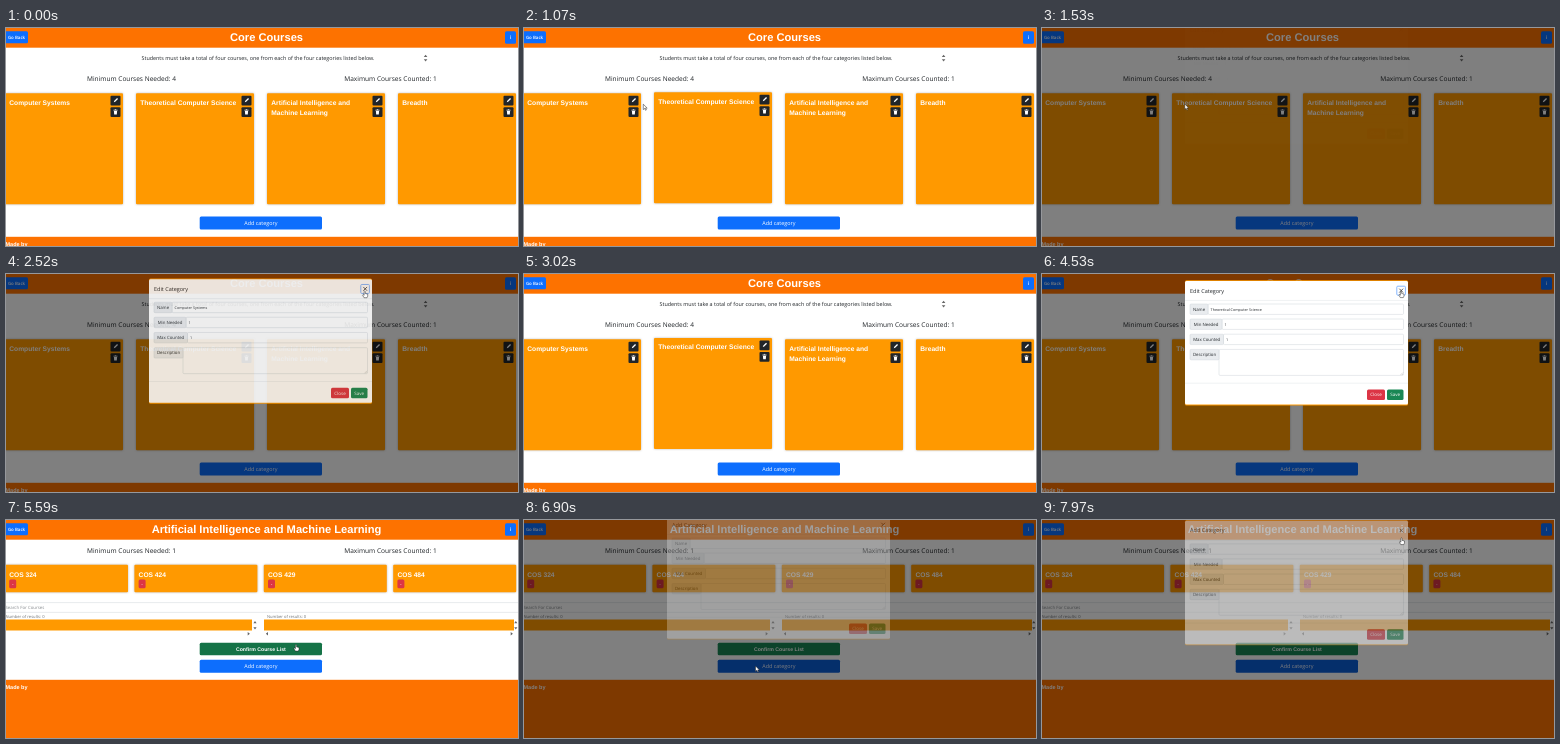
These frames come from a looping animation (512 px wide and 218 px high, 8 s). An HTML page:

```html
<!DOCTYPE html>
<html lang="en">
<head>
<meta charset="utf-8">
<title>Course categories</title>
<style>
html, body { margin: 0; width: 100%; height: 100%; overflow: hidden; background: #fff; }
svg { display: block; width: 100vw; height: 100vh; }
text { font-family: "Open Sans", "Noto Sans", sans-serif; text-rendering: geometricPrecision; white-space: pre; }
.b { font-family: "Liberation Sans", Arial, sans-serif; font-weight: bold; }
.s { font-weight: 600; }
.card { filter: drop-shadow(0 .8px .8px rgba(0, 0, 0, .28)); }
</style>
</head>
<body>
<svg viewBox="0 0 512 218" preserveAspectRatio="none">
  <g id="list"></g>
  <g id="detail"></g>
  <rect id="dim" width="512" height="218"/>
  <g id="modal"></g>
  <g id="cursor" stroke="#222" stroke-width=".5" stroke-linejoin="round" fill="#fff">
    <path id="arrow" d="M0 0V5.4L1.3 4.2L2.2 6.1L3.1 5.7L2.2 3.9H3.9Z"/>
    <path id="hand" d="M-.6 .4Q0 -.6 .6 .4V2.4L3 3V5L2.3 6.6H-.7L-2.2 4L-1.6 3.4L-.6 4.2Z"/>
  </g>
</svg>
<script>
const LOOP = 8000, NAV = 5260;
const ORANGE = '#fd7200', AMBER = '#ff9900', BLUE = '#0d6efd', BLUE_ON = '#0b5ed7',
      GREEN = '#198754', GREEN_ON = '#157347', RED = '#dc3545', INK = '#212529';
const $ = id => document.getElementById(id);

function add(parent, tag, attrs) {
  const el = document.createElementNS('http://www.w3.org/2000/svg', tag);
  for (const k in attrs) el.setAttribute(k, attrs[k]);
  return parent.appendChild(el);
}
const rect = (g, x, y, width, height, fill, more) => add(g, 'rect', {x, y, width, height, fill, ...more});
const path = (g, d, more) => add(g, 'path', {d, ...more});
function text(g, str, x, y, size, fill, cls = '', anchor = 'start') {
  const el = add(g, 'text', {x, y, 'font-size': size, fill, class: cls, 'text-anchor': anchor});
  el.textContent = str;
  return el;
}
function button(g, label, x, y, w, h, fill, size, cls) {
  const box = rect(g, x, y, w, h, fill, {rx: 1.5});
  text(g, label, x + w / 2, y + h / 2 + size * .36, size, '#fff', cls, 'middle');
  return box;
}

function frame(g, title, footY, needY, needed) {
  rect(g, 0, 0, 512, 218, '#fff');
  rect(g, 0, 0, 512, 19.7, ORANGE);
  text(g, title, 260.5, 13.2, 11.15, '#fff', 'b', 'middle');
  button(g, 'Go Back', -1, 3.2, 23, 12, BLUE, 4.4, 's');
  button(g, 'i', 499, 3.2, 11, 12.6, BLUE, 5, 's');
  text(g, 'Minimum Courses Needed: ' + needed, 125.5, needY, 6.57, INK, '', 'middle');
  text(g, 'Maximum Courses Counted: 1', 384.5, needY, 6.57, INK, '', 'middle');
  rect(g, 0, footY, 512, 218 - footY, ORANGE);
  text(g, 'Made by', -.5, footY + 9.5, 5.5, '#fff', 'b');
}

// Category list page
const list = $('list');
frame(list, 'Core Courses', 208.8, 53.4, 4);
text(list, 'Students must take a total of four courses, one from each of the four categories listed below.',
  252, 32.2, 5.42, INK, '', 'middle');
path(list, 'M417.8 29L419.6 26.8L421.4 29ZM417.8 31.2L419.6 33.4L421.4 31.2Z', {fill: '#666'});
const cards = [['Computer Systems'], ['Theoretical Computer Science'],
  ['Artificial Intelligence and', 'Machine Learning'], ['Breadth']].map((lines, i) => {
  const x = -1 + 131 * i, g = add(list, 'g', {class: 'card'});
  rect(g, x, 65.3, 118, 111, AMBER, {rx: 1});
  lines.forEach((s, n) => text(g, s, x + 4.3, 76.6 + 10.2 * n, 6.67, '#fff', 'b'));
  for (const y of [67.7, 79.2]) rect(g, x + 105.5, y, 10, 9.8, INK, {rx: 1});
  path(g, `M${x + 108.8} 74.3l.5-1.5 2.8-2.8 .9.9-2.8 2.8Z`, {fill: '#fff'});
  path(g, `M${x + 108.4} 82.2h4.2M${x + 109.8} 81.6h1.4`, {stroke: '#fff', 'stroke-width': .7});
  path(g, `M${x + 108.9} 83h3.2l-.3 3.4h-2.6Z`, {fill: '#fff'});
  return g;
});
button(list, 'Add category', 193.7, 188.6, 122.3, 13, BLUE, 5.4);

// Single category page
const detail = $('detail');
frame(detail, 'Artificial Intelligence and Machine Learning', 159.8, 33.4, 1);
[324, 424, 429, 484].forEach((n, i) => {
  const x = -1 + 129.4 * i, g = add(detail, 'g', {class: 'card'});
  rect(g, x, 44.8, 123, 27.4, AMBER, {rx: 1});
  text(g, 'COS ' + n, x + 4.2, 56.8, 6.67, '#fff', 'b');
  button(g, '-', x + 4.2, 59.4, 7, 8.8, RED, 5);
});
path(detail, 'M0 82.6H512M0 92.4H512', {stroke: '#dfe2e6', 'stroke-width': .7});
text(detail, 'Search For Courses', -.6, 89.3, 4.35, '#85898d');
[-1, 258].forEach((x, i) => {
  text(detail, 'Number of results: 0', i ? 261 : -.6, 98.3, 4.1, '#6c7075');
  rect(detail, x, 99.5, i ? 250 : 247, 11, AMBER);
  const v = i ? 509.8 : 249, r = i ? 505.5 : 242.5;
  path(detail, `M${v - 1.6} 103.2l1.6-2.2 1.6 2.2ZM${v - 1.6} 107.2l1.6 2.2 1.6-2.2ZM${r - .8} 112l2.2 1.7-2.2 1.7Z`
    + (i ? 'M262 112l-2.2 1.7 2.2 1.7Z' : ''), {fill: '#666'});
});
const confirmBtn = button(detail, 'Confirm Course List', 193.7, 122.8, 122.3, 12.4, GREEN, 5.2, 'b');
const addBtn = button(detail, 'Add category', 193.7, 139.8, 122.3, 13, BLUE, 5.4);

// Dialog
const modal = $('modal');
rect(modal, 143, 6.2, 223, 125.2, AMBER, {rx: 1.5});
rect(modal, 143, 7, 223, 123.6, '#fff', {rx: 1.5});
const heading = text(modal, '', 148, 18.6, 5.5, INK);
const ring = rect(modal, 354.8, 12.2, 8.6, 9, 'none', {rx: 1, stroke: '#86b7fe', 'stroke-width': 1});
path(modal, 'M357.3 14.7l3.8 3.8m0-3.8l-3.8 3.8', {stroke: '#333', 'stroke-width': .8});
path(modal, 'M143 26.4H366M143 109.2H366', {stroke: '#dee2e6', 'stroke-width': .5});
const fields = [['Name', 30, 18, 10.4], ['Min Needed', 45, 32, 10.4], ['Max Counted', 60.2, 33.5, 10.4],
  ['Description', 75.4, 29, 26]].map(([label, y, w, h]) => {
  const line = {stroke: '#ced4da', 'stroke-width': .5, rx: 1};
  rect(modal, 148 + w, y, 213.5 - w, h, '#fff', line);
  rect(modal, 148, y, w, 10.4, '#e9ecef', line);
  text(modal, label, 148 + w / 2, y + 6.8, 4.35, INK, '', 'middle');
  return text(modal, '', 148 + w + 2.6, y + 6.5, 3.7, INK);
});
path(modal, 'M358.5 101l2.5-2.5M360 101l1-1', {stroke: '#888', 'stroke-width': .3});
button(modal, 'Close', 325, 115.4, 18, 10.6, RED, 4.5);
button(modal, 'Save', 345, 115.4, 16.5, 10.6, GREEN, 4.5);

// Dialog sessions: backdrop start, close start, title, field values
const sessions = [
  [1380, 2500, 'Edit Category', ['Computer Systems', '1', '1']],
  [3640, 4540, 'Edit Category', ['Theoretical Computer Science', '1', '1']],
  [6713, 7891, 'Add Category', []]
];
// Card hovers: card, from, to
const hovers = [[2, 507, 738], [1, 764, 1041], [0, 1075, 1380], [1, 2800, 3640], [2, 5010, NAV]];
// Pointer stops: time, x, y
const stops = [[320, 460, 219], [620, 320, 150], [900, 180, 95], [1100, 109, 73], [1380, 109, 73],
  [1530, 142.3, 76], [1930, 330, 90], [2400, 359, 17], [2520, 359, 17], [2960, 241, 72], [3660, 241, 72],
  [3900, 270, 60], [4350, 359, 17], [4600, 359, 17], [5000, 310, 70], [5230, 300, 77], [5270, 300, 77],
  [5560, 290, 124.5], [5770, 290, 124.5], [6050, 286, 112], [6400, 231.5, 146], [6950, 231.5, 146],
  [7400, 300, 70], [7800, 359.5, 18], [LOOP, 359.5, 18]];

const clamp = v => Math.min(1, Math.max(0, v));
const easeOut = v => 1 - (1 - clamp(v)) ** 1.7;
const show = (el, on) => el.setAttribute('display', on ? 'inline' : 'none');

function pointer(t) {
  const i = Math.max(1, stops.findIndex(s => s[0] >= t));
  const [t0, x0, y0] = stops[i - 1], [t1, x1, y1] = stops[i];
  const k = clamp((t - t0) / (t1 - t0));
  return [x0 + (x1 - x0) * k, y0 + (y1 - y0) * k];
}

function draw(t) {
  const second = t >= NAV;
  show(list, !second);
  show(detail, second);

  cards.forEach((g, i) => {
    const lift = Math.max(0, ...hovers.filter(h => h[0] === i)
      .map(([, a, b]) => clamp((t - a) / 150) * (1 - clamp((t - b) / 150))));
    g.setAttribute('transform', `translate(0 ${-1.2 * lift})`);
  });

  const [open, close, title, values] = sessions.find(s => t < s[1] + 450) || sessions[2];
  const start = open + 150;
  $('dim').setAttribute('opacity', .5 * clamp((t - open) / 150) * (1 - clamp((t - close - 300) / 150)));
  const alpha = clamp((t - start) / 150) * (1 - clamp((t - close) / 150));
  const raised = 1 - easeOut((t - start) / 300) + easeOut((t - close) / 300);
  show(modal, alpha > 0);
  modal.setAttribute('opacity', alpha);
  modal.setAttribute('transform', `translate(0 ${-15 * raised})`);
  heading.textContent = title;
  fields.forEach((f, i) => f.textContent = values[i] || '');

  const [x, y] = pointer(t);
  const onClose = alpha > 0 && x > 354 && y < 22;
  const onConfirm = second && x > 194 && y > 122 && y < 135;
  const onIcon = t < open && !second && (x < 115 || x < 246 && x > 236) && y < 90;
  const onTitle = t > 4990 && t < NAV && y > 68;
  show(ring, onClose && !second);
  confirmBtn.setAttribute('fill', onConfirm ? GREEN_ON : GREEN);
  addBtn.setAttribute('fill', t > 6300 ? BLUE_ON : BLUE);

  const hand = onClose || onConfirm || onIcon || onTitle || t > 6300 && t < open;
  show($('cursor'), t >= 320 && !(t > 2960 && t < 3100));
  $('cursor').setAttribute('transform', `translate(${x} ${y})`);
  show($('hand'), hand);
  show($('arrow'), !hand);
}

function tick() {
  draw(performance.now() % LOOP);
  requestAnimationFrame(tick);
}
tick();
</script>
</body>
</html>
```
